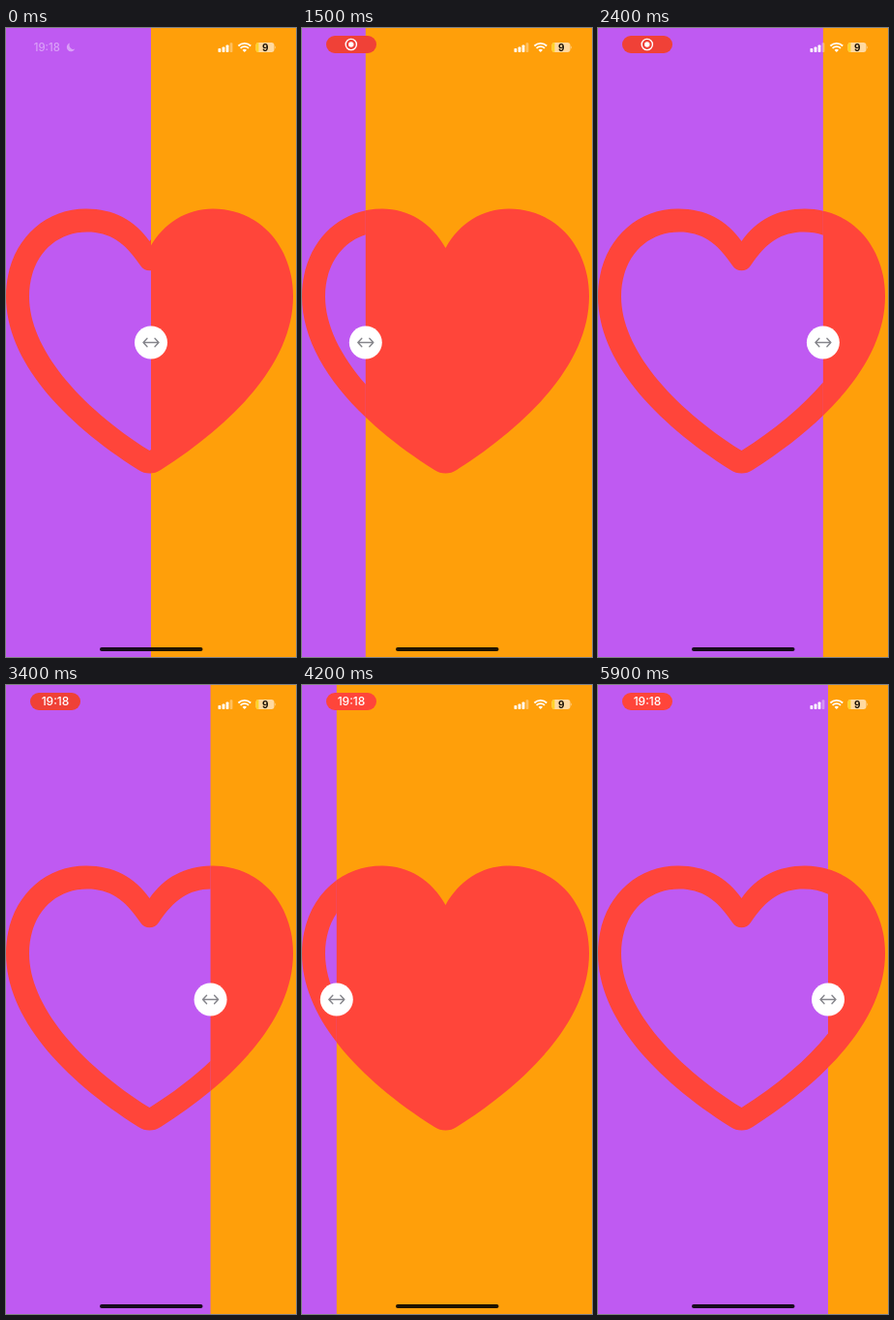
Write an HTML page that moves like this. It is 300x649 px and loops after 6100 ms.

```html
<!DOCTYPE html>
<html lang="en">
<head>
<meta charset="utf-8">
<title>Heart slider</title>
<style>
  html, body { margin: 0; width: 100%; height: 100%; overflow: hidden; background: #ff9f0a; }
  svg { display: block; width: 300px; height: 649px; }
  text { font-family: Inter, "Open Sans", sans-serif; font-weight: 500; text-anchor: middle; fill: #fff; }
  .heart { fill: #ff453a; fill-rule: evenodd; }
  .line { fill: none; stroke-linecap: round; stroke-linejoin: round; }
</style>
</head>
<body>
<svg viewBox="0 0 300 649">
  <defs>
    <clipPath id="split"><rect id="left" width="150" height="649"/></clipPath>
    <clipPath id="cell"><rect x="258.5" y="15" width="19" height="10" rx="3"/></clipPath>
  </defs>

  <rect width="300" height="649" fill="#ff9f0a"/>
  <path class="heart" d="M148.5 227C134 201 110 186.5 83 186.5C36 186.5 0 224 0 277C0 343 58 406 137 456
    C144 460.8 153 460.8 160 456C239 406 297 343 297 277C297 224 261 186.5 214 186.5C187 186.5 163 201 148.5 227Z"/>

  <g clip-path="url(#split)">
    <rect width="300" height="649" fill="#bf5af2"/>
    <path class="heart" d="M148.5 220C133 198 111 186.5 83 186.5C36 186.5 0 224 0 277C0 343 58 406 137 456
      C144 460.8 153 460.8 160 456C239 406 297 343 297 277C297 224 261 186.5 214 186.5C186 186.5 164 198 148.5 220Z
      M148.5 436C75 390 24 330 24 277C24 238 49 210.5 84 210.5C107 210.5 123 221 139 245
      C143 252 154 252 158 245C174 221 190 210.5 213 210.5C248 210.5 273 238 273 277C273 330 222 390 148.5 436Z"/>
  </g>

  <g id="knob" transform="translate(150 324.5)">
    <circle r="17" fill="#fff"/>
    <path class="line" stroke="#85858b" stroke-width="1.4" d="M-8 0H8M-4 -4.3L-8 0L-4 4.3M4 -4.3L8 0L4 4.3"/>
  </g>

  <g id="clock" opacity=".42">
    <text x="42.3" y="24" font-size="11.3">19:18</text>
    <path fill="#fff" d="M66 15.6A4.4 4.4 0 1 0 71.3 21.6A4.3 4.3 0 0 1 66 15.6Z"/>
  </g>

  <g id="pill" opacity="0">
    <rect x="25" y="8" width="52" height="18" rx="9" fill="#ff453a"/>
    <rect id="shade" x="25" y="8" width="52" height="18" rx="9" opacity="0"/>
    <g id="record">
      <circle class="line" cx="50.8" cy="17" r="5.6" stroke="#fff" stroke-width="1.4"/>
      <circle cx="50.8" cy="17" r="2.7" fill="#fff"/>
    </g>
    <text id="time" x="51" y="21.3" font-size="12" opacity="0">19:18</text>
  </g>

  <g fill="#fff">
    <rect x="219.5" y="21" width="2.8" height="4" rx=".8"/>
    <rect x="223.6" y="19.5" width="2.8" height="5.5" rx=".8"/>
    <rect x="227.6" y="17.5" width="2.8" height="7.5" rx=".8"/>
    <rect x="231.6" y="15.3" width="2.8" height="9.7" rx=".8" opacity=".35"/>
    <path d="M246.8 25L244.6 22.7A3.2 3.2 0 0 1 249 22.7Z"/>
  </g>
  <path class="line" stroke="#fff" stroke-width="1.8" style="stroke-linecap:butt"
    d="M242.6 20.8A6 6 0 0 1 251 20.8M240.4 18.5A9.2 9.2 0 0 1 253.2 18.5"/>
  <g clip-path="url(#cell)">
    <rect x="258" y="15" width="20" height="10" fill="#ffd9a0"/>
    <rect x="258" y="15" width="3.4" height="10" fill="#ffd426"/>
  </g>
  <path fill="#ffd9a0" d="M278.4 18.3Q280 20 278.4 21.7Z"/>
  <text x="268.2" y="23.7" font-size="10" style="font-weight:700;fill:#1c1206">9</text>

  <rect x="97" y="639" width="106.5" height="4" rx="2" fill="#000" opacity=".88"/>
</svg>
<script>
  const LOOP = 6100, STEP = 100, LAST = 5900;
  const $ = id => document.getElementById(id);

  // Eased value through [ms, value] points, held outside their range
  function track(points, t) {
    let [t0, v0] = points[0];
    for (const [t1, v1] of points) {
      if (t < t1) {
        const u = Math.max(0, (t - t0) / (t1 - t0 || 1));
        return v0 + (v1 - v0) * u * u * (3 - 2 * u);
      }
      [t0, v0] = [t1, v1];
    }
    return v0;
  }

  const split = [[1000, 150], [1700, 45], [1905, 45], [2474, 242], [3118, 242], [4294, 32], [4747, 32], [5397, 238]];
  const shade = [[700, 0], [1100, .15], [1800, 0], [2100, 0], [2600, .09], [3500, .06], [4000, 0]];

  function draw(now) {
    const t = Math.min(LAST, Math.floor(now % LOOP / STEP) * STEP);
    const x = track(split, t), swap = track([[2750, 0], [3050, 1]], t);
    $('left').setAttribute('width', x);
    $('knob').setAttribute('transform', `translate(${x} 324.5)`);
    const fade = (id, v) => $(id).setAttribute('opacity', v);
    fade('clock', track([[0, .42], [300, 0]], t));
    fade('pill', track([[100, 0], [500, 1]], t));
    fade('shade', track(shade, t));
    fade('record', 1 - swap);
    fade('time', swap);
  }

  const start = performance.now();
  (function frame() {
    draw(performance.now() - start);
    requestAnimationFrame(frame);
  })();
</script>
</body>
</html>
```
